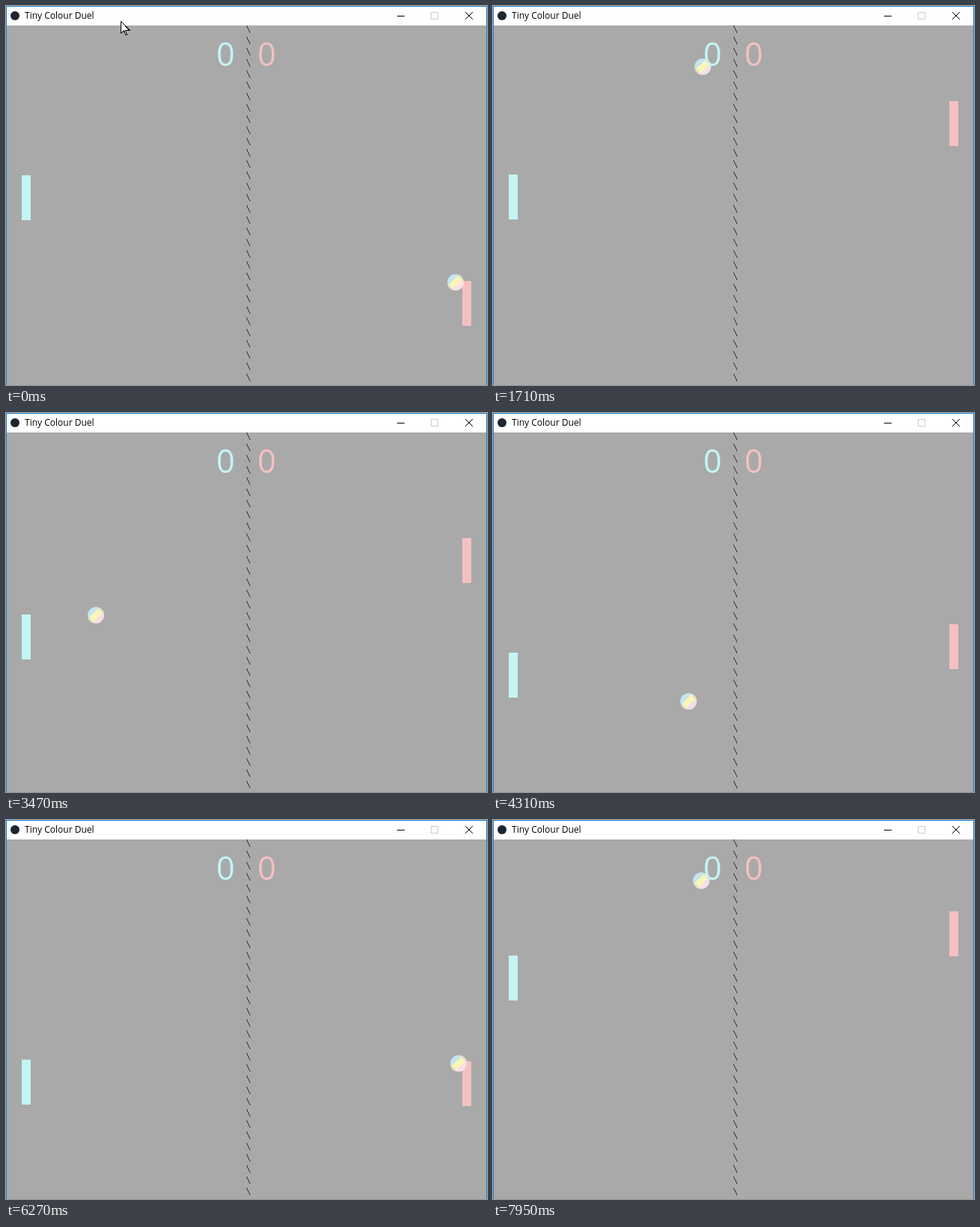
These frames come from a looping animation (642x506 px, 8000 ms). An HTML page:

```html
<!DOCTYPE html>
<html lang="en">
<head>
<meta charset="utf-8">
<title>Tiny Colour Duel</title>
<style>
  html, body { margin: 0; width: 100%; height: 100%; overflow: hidden; background: #a9a9a9; }
  svg { display: block; width: 642px; height: 506px; }
  text { font-family: "Open Sans", "Noto Sans", sans-serif; }
  .score { font-size: 43px; text-anchor: middle; }
  .crisp { shape-rendering: crispEdges; }
</style>
</head>
<body>
<svg viewBox="0 0 642 506">
  <defs>
    <clipPath id="disc"><circle r="11"/></clipPath>
  </defs>

  <rect width="642" height="506" fill="#a9a9a9"/>
  <path id="net" class="crisp" stroke="#3a2a2a" fill="none"/>

  <rect id="left" class="crisp" x="21" width="12" height="60" fill="#c3f5f4"/>
  <rect id="right" class="crisp" x="609" width="12" height="60" fill="#f4c0c0"/>
  <g id="ball">
    <g clip-path="url(#disc)"><g transform="rotate(-43)">
      <rect x="-12" y="-12" width="24" height="12" fill="#c4e5f0"/>
      <rect x="-12" width="24" height="12" fill="#f5e0e8"/>
      <rect x="-12" y="-4" width="24" height="8" fill="#e6e7bd"/>
      <rect x="-8" y="-4" width="16" height="8" fill="#fbf5b8"/>
    </g></g>
  </g>
  <text class="score" x="293" y="80" fill="#c3f5f4">0</text>
  <text class="score" x="348" y="80" fill="#f4c0c0">0</text>

  <g class="crisp">
    <rect width="642" height="26" fill="#fff"/>
    <path d="M0 506V0H642V506H641V1H1V506Z" fill="#1883d7"/>
    <rect x="522" y="13" width="10" height="1"/>
    <rect x="567.5" y="8.5" width="9" height="9" fill="none" stroke="#ccc"/>
  </g>
  <path d="M613 8L623 18M623 8L613 18" stroke="#000"/>
  <circle cx="12" cy="13" r="6" fill="#1b2633"/>
  <text x="25" y="17" font-size="12">Tiny Colour Duel</text>

  <path id="cursor" class="crisp" d="M.5 .5V16.5L4.5 13L6.5 18.5H8.5L6.5 12H11.5Z" fill="#fff" stroke="#000"/>
</svg>
<script>
const LOOP = 8000;
const TOP = 37, BOTTOM = 495, LEFT = 44, RIGHT = 598; // limits for the ball's centre
const PADDLE_HEIGHT = 60, PADDLE_STEP = 5;
const REACH_UP = 5, REACH_DOWN = 32;                  // how far the ball may get away
const RALLY = [[6.657, 6], [6.12, 5], [8.15, 6.1]];   // ball step per tick, after each hit

// Key points [ms, value]: the uneven pace of the game, and the player's moves.
const pace = [[0, 0], [1040, 28], [2440, 70], [5140, 142], [6270, 176], [LOOP, 217]];
const player = [[0, 226], [1040, 314], [1700, 225], [3250, 220], [3700, 320], [6900, 320], [LOOP, 175]];

const el = id => document.getElementById(id);

function along(path, time) {
  const next = path.findIndex(point => point[0] > time);
  const [[start, from], [end, to]] = path.slice(next - 1, next + 1);
  return Math.round(from + (to - from) * (time - start) / (end - start));
}

// Play the rally once: the right paddle chases the ball, which bounces off walls and paddles.
function playRally() {
  let x = 600, y = 369, paddle = 367, hits = 0, dirX = -1, dirY = -1;
  const states = [];
  for (let tick = 0; tick <= 217; tick++) {
    states.push({ x, y, paddle });
    if (y - REACH_UP < paddle) paddle -= PADDLE_STEP;
    else if (y - REACH_DOWN > paddle + PADDLE_HEIGHT) paddle += PADDLE_STEP;

    const [stepX, stepY] = RALLY[hits];
    x += dirX * stepX;
    y = Math.min(BOTTOM, Math.max(TOP, y + dirY * stepY));
    if (y === TOP || y === BOTTOM) dirY = y === TOP ? 1 : -1;
    if (dirX < 0 ? x < LEFT : x > RIGHT) {
      dirX = -dirX;
      hits++;
    }
  }
  return states;
}

const states = playRally();

function place(id, x, y) {
  el(id).setAttribute("transform", `translate(${Math.round(x)} ${Math.round(y)})`);
}

function draw(time) {
  const { x, y, paddle } = states[along(pace, time)];
  place("ball", x, y);
  place("right", 0, paddle);
  place("left", 0, along(player, time));

  // The mouse pointer only passes by twice.
  const early = time < 100;
  el("cursor").style.display = early || Math.abs(time - 2460) < 70 ? "" : "none";
  place("cursor", early ? 153 : 206, early ? 20 : 24);
}

el("net").setAttribute("d",
  Array.from({ length: 32 }, (_, i) => `M321 ${26 + i * 15}l5 10`).join(""));

function frame() {
  draw(performance.now() % LOOP);
  requestAnimationFrame(frame);
}
frame();
</script>
</body>
</html>
```
